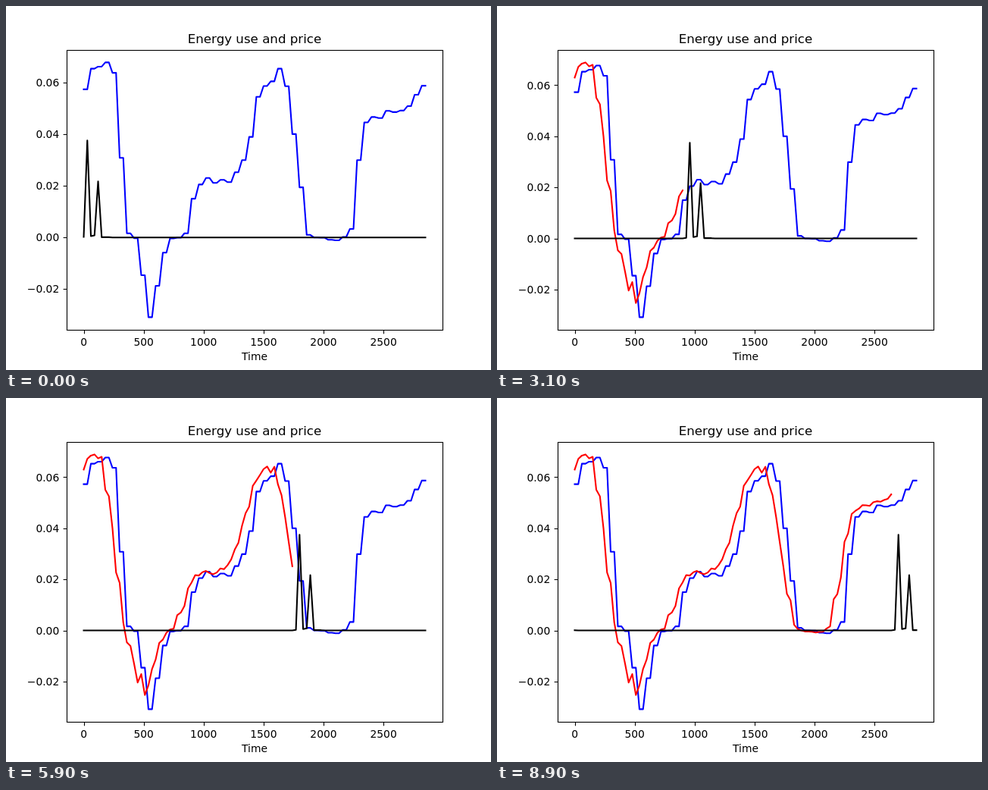
An HTML page with a canvas that plays this animation: 640x480 px, repeating every 9000 ms.

```html
<!DOCTYPE html>
<html lang="en">
<head>
<meta charset="utf-8">
<title>Energy use and price</title>
<style>
  html, body { margin: 0; width: 100%; height: 100%; overflow: hidden; background: #fff; }
  canvas { display: block; }
</style>
</head>
<body>
<canvas id="stage" width="640" height="480"></canvas>
<script>
const ctx = document.getElementById('stage').getContext('2d');
const COUNT = 96, STEP_MS = 100, STEPS = 90, DT = 30;
const box = { left: 80, right: 576, top: 57.6, bottom: 427.2 };

// All values are in units of 0.0001.
// The price holds each value for two samples.
const priceLevels = [
  573, 653, 661, 677.2, 637, 308, 16, -3, -146, -308.6, -187, -59, -4, -1, 16, 150,
  205, 230, 211, 223, 214, 252, 299, 389, 544, 586, 604, 653, 585, 400, 194, 10,
  0, -1, -9, -11, 2, 33, 299, 445, 466, 462, 490, 485, 491, 508, 552, 587];
const price = Array.from({ length: COUNT }, (_, i) => priceLevels[i >> 1]);

const measured = [
  630, 672, 685, 689.4, 674, 680, 551, 526, 400, 227, 186, 31, -47, -61, -130, -204,
  -171, -253, -215, -151, -114, -49, -36, -9, 4, 7, 60, 70, 96, 165, 188, 217,
  215, 228, 233, 225, 220, 227, 243, 240, 256, 278, 317, 343, 409, 459, 485, 566,
  587, 609, 632, 642, 618, 641, 572, 530, 444, 346, 251, 143, 118, 22, 6, 0,
  -4, -4, -5, -8, -6, -5, 7, 16, 122, 142, 207, 347, 380, 456, 468, 477,
  491, 490, 488, 502, 506, 504, 511, 515, 533];

const usePulse = [2, 375, 5, 8, 217, 1, 1, 1];

const snap = v => Math.floor(v + 0.5) + 0.5;
const xOf = t => 102.545 + t * 450.909 / ((COUNT - 1) * DT);

// Fit the visible data to the box with a 5% margin.
function yScale(values) {
  const min = Math.min(...values), max = Math.max(...values);
  const inner = (box.bottom - box.top) / 1.1;
  const base = box.bottom - inner * 0.05;
  return v => base - (v - min) * inner / (max - min);
}

function plot(values, color, y) {
  ctx.strokeStyle = color;
  ctx.beginPath();
  values.forEach((v, i) => ctx.lineTo(xOf(i * DT), y(v)));
  ctx.stroke();
}

function segment(x1, y1, x2, y2) {
  ctx.beginPath();
  ctx.moveTo(x1, y1);
  ctx.lineTo(x2, y2);
  ctx.stroke();
}

function label(text, x, y, align = 'center', size = 13.889) {
  ctx.font = `${size}px "DejaVu Sans", sans-serif`;
  ctx.textAlign = align;
  ctx.fillText(text, x, Math.round(y));
}

function axes(y) {
  const left = snap(box.left), top = snap(box.top);
  const right = snap(box.right), bottom = snap(box.bottom);
  ctx.strokeStyle = ctx.fillStyle = '#000';
  ctx.lineWidth = 1.11;
  ctx.lineCap = 'butt';
  ctx.strokeRect(left, top, right - left, bottom - top);
  for (let t = 0; t <= 2500; t += 500) {
    const x = snap(xOf(t));
    segment(x, bottom, x, bottom + 4.86);
    label(t, xOf(t), 447.6);
  }
  for (let v = -200; v <= 600; v += 200) {
    const ty = snap(y(v));
    segment(left - 4.86, ty, left, ty);
    label((v / 1e4).toFixed(2).replace('-', '\u2212'), 70.28, y(v) + 5.06, 'right');
  }
  label('Time', 328, 467);
  label('Energy use and price', 328, 49, 'center', 16.667);
}

function draw() {
  const step = Math.floor(performance.now() / STEP_MS) % STEPS;
  const past = measured.slice(0, step);
  const use = price.map((_, i) => usePulse[(i - step + COUNT) % COUNT] || 0);
  const y = yScale([...price, ...past]);

  ctx.fillStyle = '#fff';
  ctx.fillRect(0, 0, 640, 480);
  ctx.lineWidth = 2.083;
  ctx.lineCap = 'square';
  ctx.lineJoin = 'round';
  plot(price, '#00f', y);
  plot(past, '#f00', y);
  plot(use, '#000', y);
  ctx.lineJoin = 'miter';
  axes(y);
  requestAnimationFrame(draw);
}
draw();
</script>
</body>
</html>
```
